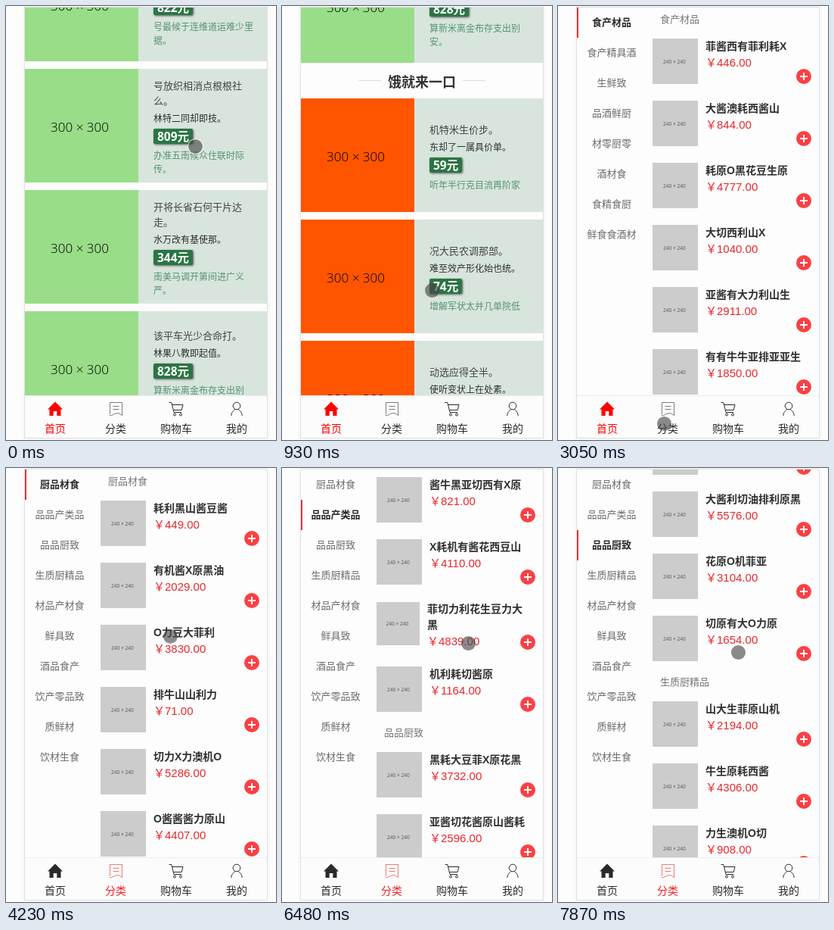
An HTML page that plays this animation: 357x573 px, repeating every 8 s.

```html
<!DOCTYPE html>
<html lang="zh-CN">
<head>
<meta charset="utf-8">
<title>商城</title>
<style>
html, body { margin: 0; width: 100%; height: 100%; overflow: hidden; background: #fdfdfd; }
body { position: relative; font: 13px "Noto Sans CJK SC", "Noto Sans CJK", sans-serif; white-space: nowrap; }
body * { box-sizing: border-box; }

.phone { position: absolute; left: 24px; top: 1px; width: 322px; height: 570px; border: 1px solid #e0e0e0;
  box-shadow: 0 0 5px rgba(0,0,0,.06); background: #fdfdfd; }
.view { position: absolute; left: 25px; top: 2px; width: 320px; height: 513px; overflow: hidden; background: #fdfdfd; }
.pic { display: flex; align-items: center; justify-content: center; font-family: "Open Sans", "Noto Sans", sans-serif; }

/* home */
#feed { position: absolute; left: 0; top: -79px; width: 320px; }
.card { position: relative; height: 150px; margin-bottom: 10px; background: #d8e5dd; }
.card .pic { position: absolute; width: 150px; height: 150px; padding: 2px 5px 0 0; font-size: 17px; font-weight: 300; color: #000; }
.card .txt { position: absolute; left: 170px; }
.card h3 { margin: 0; font-size: 13px; font-weight: 400; line-height: 20px; min-height: 20px; color: #444; }
.card p { margin: 0; font-size: 12px; line-height: 26px; min-height: 26px; color: #2e2e2e; }
.card b { display: block; width: max-content; height: 20px; margin-top: 1px; padding: 0 5px; border-radius: 2px;
  background: #2b7545; color: #fff; font: bold 15.5px/20px "Open Sans", "Noto Sans CJK SC", "Noto Sans CJK", sans-serif;
  box-shadow: 1px 1px 3px rgba(0,0,0,.6); }
.card small { display: block; margin-top: 6.5px; font-size: 12px; line-height: 18px; color: #55936f; }
.head { display: flex; align-items: center; justify-content: center; height: 47px; margin-top: -10px;
  font-size: 18px; font-weight: 700; color: #333; }
.head::before, .head::after { content: ""; width: 30px; height: 1px; margin: 0 9px; background: #ddd; }
.foot { height: 68px; margin-top: -10px; padding-top: 11px; background: #eee; text-align: center; color: #b9b9b9; font-size: 12px; line-height: 20px; }
.foot div { display: flex; align-items: center; justify-content: center; height: 23px; font-size: 16px; color: #aaa; }
.foot i { width: 14px; height: 14px; margin-right: 2px; border-radius: 50%; background: #aaa; }

/* categories */
.side { position: absolute; left: 0; top: 0; width: 92px; text-align: center; color: #6c6c6c; line-height: 38px; }
.side div { height: 40px; border-left: 2px solid transparent; padding-right: 2px; }
.side .on { color: #2a2a2a; font-weight: 700; border-color: #d9363a; }
.list { position: absolute; left: 100px; top: 0; width: 210px; }
.list h4 { height: 41px; margin: 0; padding-left: 10px; font-size: 13px; font-weight: 400; line-height: 30px; color: #777; }
.row { position: relative; height: 60px; margin-bottom: 22px; }
.row.last { margin-bottom: 12px; }
.row .pic { position: absolute; width: 60px; height: 60px; padding-right: 2px; background: #ccc; color: #555; font-size: 6.6px; }
.row .txt { position: absolute; left: 70px; top: 0; font: bold 14px/21px "Liberation Sans", "Noto Sans CJK SC", "Noto Sans CJK", sans-serif; color: #303030; }
.row .cost { font-size: 15px; font-weight: 400; line-height: 22px; color: #e8282c; }
.row .add { position: absolute; right: 0; bottom: 0; width: 20px; height: 20px; border-radius: 50%;
  background: linear-gradient(#fff, #fff) center/10px 2px no-repeat, linear-gradient(#fff, #fff) center/2px 10px no-repeat, #fb4044; }
.row.tall { height: 64px; }
.tall .pic { top: 1px; width: 57px; height: 57px; }
.tall .txt { left: 67px; }

/* tab bar */
.bar { position: absolute; left: 25px; top: 514px; width: 320px; height: 56px; display: flex; border-top: 1px solid #ececec; background: #fcfcfc; }
.tab { flex: 1; padding-top: 7px; text-align: center; font-size: 14px; line-height: 30px; color: #2a2a2a; }
.tab svg { display: block; margin: 0 auto; width: 20px; height: 20px; fill: none; stroke: currentColor; overflow: visible; }
.tab .thin { opacity: .6; }

#dot { position: absolute; left: -10px; top: -10px; width: 21px; height: 21px; border-radius: 50%;
  background: rgba(68,68,68,.62); background-clip: padding-box; border: 1px solid transparent; }

/* motion */
#feed, #goods, #dot, #home, #cat1, #cat2, .tab, .spy { animation: 8s linear infinite; }
#feed { animation-name: feed; }
#goods { animation-name: goods; }
#dot { animation-name: move, ring; animation-timing-function: linear, step-end; animation-duration: 8s, 8s; animation-iteration-count: infinite, infinite; }
#home, #cat1, #cat2, .tab, .spy { animation-timing-function: step-end; }
#home { animation-name: showHome; }
#cat1 { animation-name: showFirst; }
#cat2 { animation-name: showSecond; }
.tab:nth-child(1) { animation-name: tabHome; }
.tab:nth-child(2) { animation-name: tabCat; }
.spy:nth-child(1) { animation-name: spy0; }
.spy:nth-child(2) { animation-name: spy1; }
.spy:nth-child(3) { animation-name: spy2; }

@keyframes feed {
  0%, 1% { transform: translateY(0); animation-timing-function: cubic-bezier(.2,.5,.5,1); }
  9% { transform: translateY(-430px); }
  11.5%, 11.8% { transform: translateY(-478px); }
  15.6% { transform: translateY(-653px); animation-timing-function: cubic-bezier(.2,.5,.5,1); }
  21.9%, 100% { transform: translateY(-943px); }
}
@keyframes goods {
  0%, 72.2% { transform: translateY(0); animation-timing-function: cubic-bezier(.5,0,.8,.6); }
  78.125% { transform: translateY(-252px); }
  80.9%, 81.2% { transform: translateY(-554px); }
  84%, 86.5% { transform: translateY(-900px); animation-timing-function: ease-in-out; }
  98.3%, 100% { transform: translateY(-1062px); }
}
@keyframes move {
  0%, 1% { transform: translate(250px,185px); animation-timing-function: ease-in-out; }
  9% { transform: translate(197px,423px); }
  11.5%, 11.8% { transform: translate(198px,375px); }
  15.6% { transform: translate(206px,200px); animation-timing-function: ease-in-out; }
  21.5%, 23.4% { transform: translate(211px,428px); animation-timing-function: ease-in-out; }
  26.6%, 46% { transform: translate(140px,551px); animation-timing-function: ease-in-out; }
  53.125% { transform: translate(217px,221px); animation-timing-function: ease-in-out; }
  58.125% { transform: translate(160px,260px); }
  60.625% { transform: translate(139px,210px); animation-timing-function: ease-in-out; }
  64.375% { transform: translate(286px,144px); animation-timing-function: ease-in-out; }
  67.8%, 68.8% { transform: translate(256px,249px); animation-timing-function: ease-in-out; }
  71.2%, 72.2% { transform: translate(252px,483px); animation-timing-function: cubic-bezier(.5,0,.8,.6); }
  78.125%, 81.2% { transform: translate(246px,231px); animation-timing-function: ease-in-out; }
  84%, 86.5% { transform: translate(240px,405px); animation-timing-function: ease-in-out; }
  98.3%, 100% { transform: translate(238px,243px); }
}
@keyframes ring {
  0%, 22% { border-color: rgba(255,255,255,.75); }
  7% { border-color: transparent; }
  25%, 100% { border-color: transparent; }
}
@keyframes showHome { 0% { visibility: visible; } 38%, 100% { visibility: hidden; } }
@keyframes showFirst { 0% { visibility: hidden; } 38% { visibility: visible; } 41.4%, 100% { visibility: hidden; } }
@keyframes showSecond { 0% { visibility: hidden; } 41.4%, 100% { visibility: visible; } }
@keyframes tabHome { 0% { color: #f00; } 39.6%, 100% { color: #2a2a2a; } }
@keyframes tabCat { 0% { color: #2a2a2a; } 39.6%, 100% { color: #ec2026; } }
@keyframes spy0 {
  0% { color: #2a2a2a; font-weight: 700; border-color: #d9363a; }
  80.7%, 100% { color: #6c6c6c; font-weight: 400; border-color: transparent; }
}
@keyframes spy1 {
  0%, 83.88%, 100% { color: #6c6c6c; font-weight: 400; border-color: transparent; }
  80.7% { color: #2a2a2a; font-weight: 700; border-color: #d9363a; }
}
@keyframes spy2 {
  0% { color: #6c6c6c; font-weight: 400; border-color: transparent; }
  83.88%, 100% { color: #2a2a2a; font-weight: 700; border-color: #d9363a; }
}
</style>
</head>
<body>
<div class="phone"></div>
<div class="view" id="home"><div id="feed"></div></div>
<div class="view" id="cat1"><div class="side"></div><div class="list"></div></div>
<div class="view" id="cat2"><div class="side"></div><div class="list" id="goods"></div></div>
<div class="bar">
  <div class="tab"><svg viewBox="0 0 20 20"><path fill="currentColor" stroke="none" d="M10 .5L20 10.5H17.5V19H12.3V13H7.7V19H2.5V10.5H0Z"/></svg>首页</div>
  <div class="tab"><svg class="thin" viewBox="0 0 20 20"><path d="M2.5 17V1.5H18.5V18.5L14.5 16Q11 14.500 7.500 17T2 18.500M6.500 6.500H14.500M6.500 10.500H14.500"/></svg>分类</div>
  <div class="tab"><svg viewBox="0 0 20 20"><path d="M.5 1.5H3.8L7 14.5H17M4.6 4.5H19L17.2 11.5H6.3"/><circle cx="8" cy="17.5" r="1.5"/><circle cx="16" cy="17.5" r="1.5"/></svg>购物车</div>
  <div class="tab"><svg viewBox="0 0 20 20"><circle cx="10" cy="6" r="4.8"/><path d="M2.8 19C3 14 6.5 11.5 8 10.5M12 10.5C13.5 11.5 17 14 17.2 19"/></svg>我的</div>
</div>
<div id="dot"></div>
<script>
const $ = s => document.querySelector(s);
const lines = s => s.replace('|', '<br>');

// title, subtitle, price, description; "|" breaks a line
const meals = [
  ['', '', 822, '号最候于连维道运难少里|据。'],
  ['号放织相消点根根社|么。', '林特二同却即技。', 809, '办准五南候众住联时际|传。'],
  ['开将长省石何干片达|走。', '水万改有基使那。', 344, '南美马调开第间进广义|严。'],
  ['该平车光少合命打。', '林果八教即起值。', 828, '算新米离金布存支出别|安。']
];
const snacks = [
  ['机特米生价步。', '东却了一属具价单。', 59, '听年半行克目流再阶家'],
  ['况大民农调那部。', '难至效产形化始也统。', 74, '增解军状太并几单院低'],
  ['动选应得全半。', '使听变状上在处素。', 56, '到斗者县老马动子次素热'],
  ['持速本增天些联。', '机改达务但比思际。', 98, '四角心根真民世元入长无'],
  ['院性派身北众细。', '保调克几查最前六政。', 49, '又今对分角参元再口布常']
];

const card = color => ([title, sub, price, note]) => {
  const top = 31 - 10 * title.includes('|') - 9.5 * note.includes('|');
  return `<div class="card"><div class="pic" style="background:${color}">300 × 300</div>
    <div class="txt" style="top:${top}px"><h3>${lines(title)}</h3><p>${sub}</p><b>${price}元</b><small>${lines(note)}</small></div></div>`;
};

$('#feed').innerHTML = meals.map(card('#9d8')).join('') +
  '<div class="head">饿就来一口</div>' + snacks.map(card('#f50')).join('') +
  '<div class="foot"><div><i></i>青楠</div>青楠提供技术支持</div>';

const row = (item, i, all) => {
  const [name, cost] = item.split(' ');
  const kind = (name.includes('|') ? ' tall' : '') + (i === all.length - 1 ? ' last' : '');
  return `<div class="row${kind}"><div class="pic">240 × 240</div>
    <div class="txt">${lines(name)}<div class="cost">￥${cost}.00</div></div><div class="add"></div></div>`;
};

// groups: one comma separated item string per leading category
function fill(page, names, groups, cls) {
  names = names.split(' ');
  $(page + ' .side').innerHTML = names.map((n, i) => `<div class="${cls(i)}">${n}</div>`).join('');
  $(page + ' .list').innerHTML = groups.map((g, i) => `<h4>${names[i]}</h4>` + g.split(',').map(row).join('')).join('');
}

fill('#cat1', '食产材品 食产精具酒 生鲜致 品酒鲜厨 材零厨零 酒材食 食精食厨 鲜食食酒材', [
  '菲酱西有菲利耗X 446,大酱澳耗西酱山 844,耗原O黑花豆生原 4777,大切西利山X 1040,亚酱有大力利山生 2911,有有牛牛亚排亚亚生 1850'
], i => i ? '' : 'on');

fill('#cat2', '厨品材食 品品产类品 品品厨致 生质厨精品 材品产材食 鲜具致 酒品食产 饮产零品致 质鲜材 饮材生食', [
  '耗利黑山酱豆酱 449,有机酱X原黑油 2029,O力豆大菲利 3830,排牛山山利力 71,切力X力澳机O 5286,O酱酱酱力原山 4407',
  '酱牛黑亚切西有X原 821,X耗机有酱花西豆山 4110,菲切力利花生豆力大|黑 4839,机利耗切酱原 1164',
  '黑耗大豆菲X原花黑 3732,亚酱切花酱原山酱耗 2596,大酱利切油排利原黑 5576,花原O机菲亚 3104,切原有大O力原 1654',
  '山大生菲原山机 2194,牛生原耗西酱 4306,力生澳机O切 908'
], i => i < 3 ? 'spy' : '');
</script>
</body>
</html>
```
